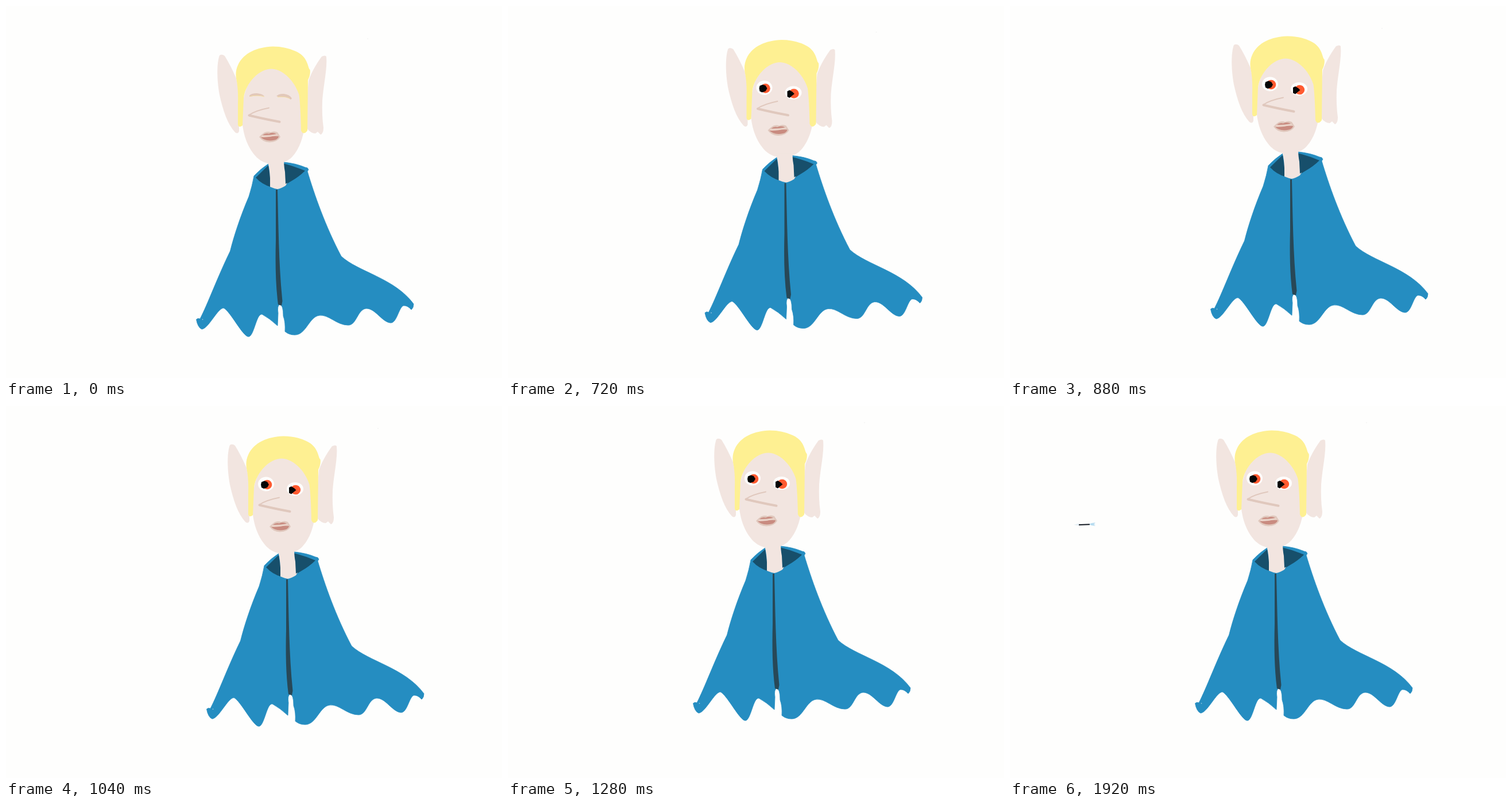
An HTML page that plays this animation: 864x648 px, repeating every 2000 ms.

```html
<!DOCTYPE html>
<html lang="en">
<head>
<meta charset="utf-8">
<title>Elf</title>
<style>
  html, body { margin: 0; width: 100%; height: 100%; overflow: hidden; background: #fefefd; }
  svg { display: block; width: 100%; height: 100%; }
  .skin { fill: #f2e5e0; }
  .cape { fill: #258dc1; stroke: #258dc1; stroke-width: .8; }
  .lining { fill: #174f6b; }
  .line { fill: none; stroke: #e0c8bd; stroke-linecap: round; stroke-linejoin: round; }
</style>
</head>
<body>
<svg viewBox="0 0 864 648">
  <rect width="864" height="648" fill="#fefefd"/>
  <g id="elf">
    <circle cx="630" cy="57" r=".8" fill="#eeeeed"/>
    <!-- ears -->
    <path class="skin" d="M372 86Q376 83 381 87Q392 105 401 126L406 150V218Q404 224 399 220C386 206 378 182 372 155C367 128 367 99 372 86Z"/>
    <path class="skin" d="M558 88Q556 85 550 88C542 99 533 113 527 130L524 165V213Q531 222 539 222L543 219L548 224Q553 222 553 212Q550 190 551 165C553 137 560 109 558 88Z"/>
    <!-- head -->
    <path class="skin" d="M463 106C433 106 411 140 411 190C411 222 421 248 437 264Q449 275 464 275Q484 275 495 266C511 252 521 224 521 193C521 140 495 106 463 106Z"/>
    <path fill="#fef092" d="M404 207Q406 213 412 208L414 160C418 133 441 109.500 463 109.500C484 110.500 504 133 510.500 155Q513 173 514 217Q518 226 525 217L526 129Q531 119 529.500 111C525 107 527 89 505 79Q487 70.500 465 70.500C438 71.500 414 81 404 103Q399 114 401 126Q405 145 404 170Z"/>
    <!-- cape -->
    <path class="cape" d="M432 296Q443 284 457 275L462 302L486 300L483 272Q505 274 521 281L525 282L527 285L525 288C537 328 556 383 584 436C613 463 677 474 710 519Q710 526 706 529Q699 521 692 522C684 526 681 552 670 552C655 551 643 526 627 527C612 529 611 556 596 556C576 556 562 537 546 539C528 541 523 573 503 573Q493 573 486 567Q487 551 483 540Q483 521 477 520Q472 522 474 535L473 557Q459 544 446 537C436 535 432 577 422 576C412 575 391 532 379 526C368 527 353 562 341 563Q334 560 331.500 546Q334 543 338 545C351 520 369 471 390.500 427C397 401 408 367 423 332Q429 313 432 296Z"/>
    <path class="lining" d="M435 299L457 277.500L463 316Q446 311 435 299Z"/>
    <path class="lining" d="M484 274.500Q502 279 521 287Q511 297 497 305L487 311Z"/>
    <path class="skin" d="M455 268L485 268Q483 273 486 289L487 310L490 308L487 313Q479 318 473 319Q467 318 460 315L460 300Q459 283 457 276Z"/>
    <path fill="#284857" d="M470 320L473 320C474.500 380 475 450 481.500 514L480 522L474 520C469.500 485 469 448 470 408Z"/>
    <circle cx="342.5" cy="546" r=".8" fill="#b9d9e9"/>
    <!-- nose and mouth -->
    <path class="line" stroke-width="2" d="M458 177.500Q435 182 423 190"/>
    <path class="line" stroke-width="4" d="M423.500 190.500Q446 196 476.500 201.800"/>
    <path fill="#e0c8bd" d="M441 228Q447 222 451 220Q457 218 461 220Q467 217 473 220L478 228Q473 237 459 237.500Q447 237 441 228Z"/>
    <path fill="#c98b80" d="M444 228.500Q450 229 459 228Q467 226 475 227Q474 234 460 234.500Q449 234 444 228.500ZM447 225Q452 220.500 458 222.500Q465 219.500 471 223Q460 225 447 225Z"/>
    <path class="line" stroke-width="1.800" style="stroke:#f0d8ce" d="M446 227Q460 227.500 472 224.500"/>
    <g id="closed">
      <path fill="#e2c8b9" d="M424 156Q427 152 437 152Q447 153 450 157Q437 155 424 158ZM471 157Q475 152.500 484 153Q494 154 498 161L496 163Q490 158 482 158.500Q476 159 471 157Z"/>
      <path fill="none" stroke="#f5dda5" stroke-width="1" d="M425 157.500Q437 154.500 450 158M473 158.500Q485 157 494 161"/>
    </g>
    <g id="open">
      <ellipse cx="435" cy="154" rx="14" ry="12.500" fill="#fefefd"/>
      <ellipse cx="437" cy="155" rx="8.300" ry="8.300" fill="#ff5a30"/>
      <path fill="#050505" d="M427 150.500L432 148.500L437 150L440 155L437 160L431 162L427 160L426 155Z"/>
      <ellipse cx="485.500" cy="162.500" rx="14.500" ry="11.500" fill="#fefefd"/>
      <ellipse cx="486.500" cy="164" rx="8.700" ry="8.300" fill="#ff5a30"/>
      <path fill="#050505" d="M475 160L479 158L484 161L487.500 164.500L483 168L479 171.500L475 169.500Z"/>
    </g>
  </g>
  <g id="arrow">
    <path fill="#e4eef4" d="M0 5L9 2.500V6.500Z"/>
    <path fill="none" stroke="#111820" stroke-width="2" d="M9 5L28 4.300"/>
    <path fill="#b8dcf0" d="M27 4L31 2L38 1L35 3.500L38 4L35 5L38 7L31 6Z"/>
  </g>
</svg>
<script>
const STEP = 80, LOOP = 2000;
const $ = id => document.getElementById(id);
const elf = $('elf'), closed = $('closed'), open = $('open'), arrow = $('arrow');

// Offsets of the trembling body
const REST = [0, 0], NEAR = [11.5, -11.5], FAR = [18, -18],
      HIGH = [-15, -42], HOVER = [-9, -28];
const shake = [NEAR, HOVER, FAR, HIGH, FAR, HIGH, NEAR, HOVER, HIGH];

const show = (el, on) => el.setAttribute('visibility', on ? 'visible' : 'hidden');
const move = (el, x, y) => el.setAttribute('transform', `translate(${x} ${y})`);

function arrowX(step) {
  if (step < 17 || step === 22) return null;
  return step < 22 ? 191 + (21 - step) * 40 : 111 + (24 - step) * 40;
}

function draw(ms) {
  const step = Math.floor((ms % LOOP) / STEP);
  const awake = step >= 6;
  const pose = step < 9 ? REST : shake[step - 9] || HOVER;
  move(elf, ...pose);
  show(closed, !awake);
  show(open, awake);

  const x = arrowX(step);
  show(arrow, x !== null);
  if (x !== null) move(arrow, x, 202);
}

const start = performance.now();
function tick() {
  draw(performance.now() - start);
  requestAnimationFrame(tick);
}
draw(0);
requestAnimationFrame(tick);
</script>
</body>
</html>
```
